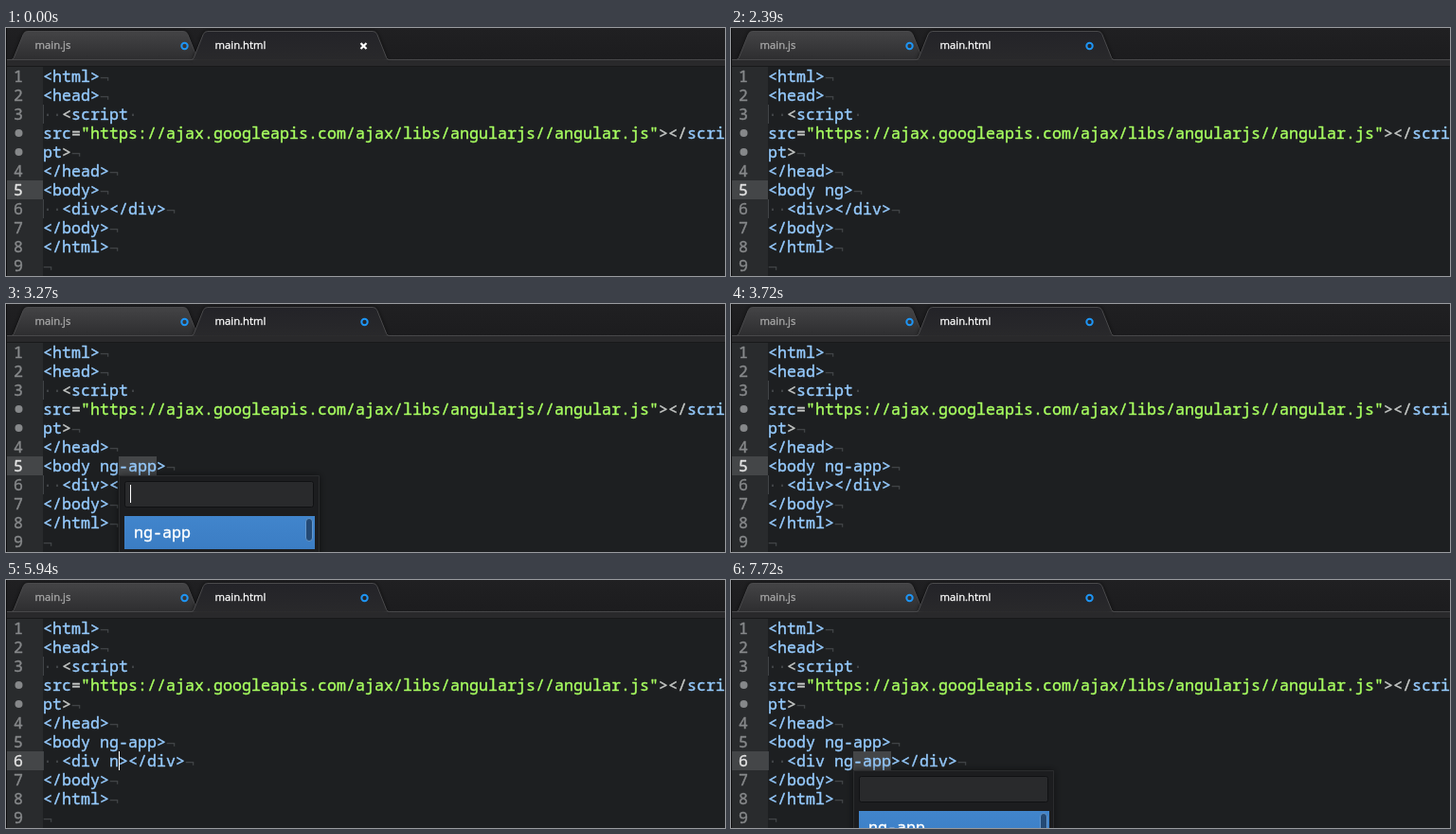
An HTML page with a canvas for the animation above (8000 ms loop, 759x262 px).

```html
<!DOCTYPE html>
<html lang="en">
<head>
<meta charset="utf-8">
<title>Editor</title>
<style>
html, body { margin: 0; width: 100%; height: 100%; overflow: hidden; background: #1d1f21; }
canvas { display: block; }
</style>
</head>
<body>
<canvas id="stage" width="759" height="262"></canvas>
<script>
const ctx = document.getElementById('stage').getContext('2d');
const LOOP = 8000, LEFT = 39, TOP = 41, CHAR = 10, ROW = 20;
const CODE_FONT = '16.6px "Noto Sans Mono", monospace';
const MARK_FONT = '16.6px "DejaVu Sans Mono", monospace';
const TAB_FONT = '11.3px "Open Sans", sans-serif';
const BLUE = '#96cbfe', GREEN = '#a8ff60', PLAIN = '#c5c8c6', FAINT = '#404346';

// Each step changes only the listed parts of the editor state.
const steps = [
  [0, { body: '', div: '', line: 5, col: 5, caret: false, modified: false, popup: null }],
  [440, { caret: true }],
  [740, { caret: false }],
  [890, { body: ' ', col: 6, caret: true }],
  [1040, { modified: true }],
  [1190, { caret: false }],
  [1490, { caret: true }],
  [1640, { body: ' n', col: 7 }],
  [2090, { body: ' ng', col: 8 }],
  [2390, { caret: false }],
  [2530, { body: ' ng-app', popup: { focus: true } }],
  [2830, { popup: { focus: false } }],
  [3270, { popup: { focus: true } }],
  [3720, { popup: null, col: 12 }],
  [4020, { caret: true }],
  [4310, { line: 6 }],
  [4460, { col: 11 }],
  [4610, { col: 10 }],
  [4750, { col: 9 }],
  [4900, { col: 8 }],
  [5040, { col: 7 }],
  [5190, { col: 6 }],
  [5340, { caret: false }],
  [5640, { caret: true }],
  [5790, { div: ' ', col: 7 }],
  [5940, { div: ' n', col: 8 }],
  [6240, { div: ' ng', col: 9 }],
  [6390, { div: ' ng-', col: 10 }],
  [6830, { div: ' ng', col: 9 }],
  [7280, { caret: false }],
  [7430, { div: ' ng-app', popup: { focus: true } }],
  [7720, { popup: { focus: false } }]
];

const stateAt = time =>
  Object.assign({}, ...steps.filter(([start]) => start <= time).map(([, change]) => change));

function rect(x, y, w, h, color) {
  ctx.fillStyle = color;
  ctx.fillRect(x, y, w, h);
}

function text(string, x, y, color, font = CODE_FONT, weight = .4) {
  ctx.font = font;
  ctx.fillStyle = ctx.strokeStyle = color;
  ctx.fillText(string, x, y);
  if (!weight) return;
  ctx.lineWidth = weight;
  ctx.lineJoin = 'round';
  ctx.strokeText(string, x, y);
}

// Code keeps to the character grid whatever the font's own advance.
function code(string, x, y, color) {
  [...string].forEach((char, i) => text(char, x + i * CHAR, y, color));
}

function disc(x, y, radius, color) {
  ctx.beginPath();
  ctx.arc(x, y, radius, 0, Math.PI * 2);
  ctx.fillStyle = color;
  ctx.fill();
}

function box(x, y, w, h, radius, fill, stroke) {
  ctx.beginPath();
  ctx.roundRect(x + .5, y + .5, w - 1, h - 1, radius);
  ctx.fillStyle = fill;
  ctx.fill();
  ctx.strokeStyle = stroke;
  ctx.lineWidth = 1;
  ctx.stroke();
}

function verticalGradient(y0, y1, from, to) {
  const gradient = ctx.createLinearGradient(0, y0, 0, y1);
  gradient.addColorStop(0, from);
  gradient.addColorStop(1, to);
  return gradient;
}

function tab(x, width, label, color, fill, edge) {
  const right = x + width;
  ctx.beginPath();
  ctx.moveTo(x, 33.5);
  ctx.arcTo(x + 3, 33.5, x + 15, 3.5, 3);
  ctx.arcTo(x + 15, 3.5, right - 15, 3.5, 5);
  ctx.arcTo(right - 15, 3.5, right - 3, 33.5, 5);
  ctx.arcTo(right - 3, 33.5, right, 33.5, 3);
  ctx.lineTo(right, 33.5);
  ctx.save();
  ctx.shadowColor = 'rgba(0, 0, 0, .7)';
  ctx.shadowBlur = 5;
  ctx.fillStyle = fill;
  ctx.fill();
  ctx.restore();
  ctx.strokeStyle = edge;
  ctx.lineWidth = 1;
  ctx.stroke();
  text(label, x + 26, 22, color, TAB_FONT, .3);
}

function modifiedRing(x) {
  ctx.beginPath();
  ctx.arc(x, 19, 3.2, 0, Math.PI * 2);
  ctx.strokeStyle = '#1e95f5';
  ctx.lineWidth = 2;
  ctx.stroke();
}

function closeCross(x) {
  ctx.beginPath();
  ctx.moveTo(x - 3, 16);
  ctx.lineTo(x + 3, 22);
  ctx.moveTo(x + 3, 16);
  ctx.lineTo(x - 3, 22);
  ctx.strokeStyle = '#fff';
  ctx.lineWidth = 2.2;
  ctx.stroke();
}

function drawTabs(modified) {
  rect(0, 0, 759, 34, verticalGradient(0, 34, '#202022', '#1c1c1e'));
  tab(4.5, 201, 'main.js', '#aaa', verticalGradient(3, 33, '#444446', '#2e2e30'), '#4a4a4c');
  rect(0, 33, 759, 1, '#48484a');
  rect(0, 34, 759, 6, '#29292b');
  tab(194.5, 211, 'main.html', '#fff', verticalGradient(3, 34, '#232328', '#29292b'), '#4a4a4c');
  rect(197, 34, 206, 6, '#29292b');
  rect(0, 40, 759, 1, '#18191a');
  modifiedRing(188.5);
  modified ? modifiedRing(378.5) : closeCross(377.5);
}

// Segments are [string, color] pairs.
function drawLine(row, segments, { newline = true, indent = 0, trailing = false } = {}) {
  const baseline = TOP + row * ROW + 16;
  const mark = (char, drop = 0) => text(char, x, baseline + drop, FAINT, MARK_FONT, 0);
  let x = LEFT;
  if (indent) rect(LEFT, TOP + row * ROW, 1, ROW, FAINT);
  for (let i = 0; i < indent; i++, x += CHAR) mark('·');
  for (const [string, color] of segments) {
    code(string, x, baseline, color);
    x += string.length * CHAR;
  }
  if (trailing) mark('·');
  else if (newline) mark('¬', 2);
}

function drawGutter(activeRow) {
  rect(0, TOP, LEFT, 262 - TOP, '#292b2d');
  rect(1, TOP + activeRow * ROW, LEFT - 1, ROW, '#444648');
  ['1', '2', '3', '', '', '4', '5', '6', '7', '8', '9'].forEach((label, row) => {
    const y = TOP + row * ROW;
    const color = row === activeRow ? '#e4e4e4' : '#86888a';
    if (label) code(label, 8, y + 16, color);
    else disc(13.5, y + 10, 4, color);
  });
  rect(0, 0, 1, 262, '#0c0c0d');
}

function drawCode({ body, div }) {
  const tag = string => [[string, BLUE]];
  drawLine(0, tag('<html>'));
  drawLine(1, tag('<head>'));
  drawLine(2, [['<', PLAIN], ['script', BLUE]], { indent: 2, trailing: true });
  drawLine(3, [
    ['src', BLUE], ['=', PLAIN],
    ['"https://ajax.googleapis.com/ajax/libs/angularjs//angular.js"', GREEN],
    ['></', PLAIN], ['scri', BLUE]
  ], { newline: false });
  drawLine(4, [['pt', BLUE], ['>', PLAIN]]);
  drawLine(5, tag('</head>'));
  drawLine(6, tag(`<body${body}>`));
  drawLine(7, tag(`<div${div}></div>`), { indent: 2 });
  drawLine(8, tag('</body>'));
  drawLine(9, tag('</html>'));
  drawLine(10, []);
}

function drawPopup(x, y, focus) {
  ctx.save();
  ctx.shadowColor = 'rgba(0, 0, 0, .5)';
  ctx.shadowBlur = 8;
  rect(x, y, 212, 120, '#1c1d1f');
  ctx.restore();
  box(x, y, 212, 120, 0, '#1c1d1f', '#2b2c2e');
  box(x + 6, y + 6, 200, 28, 2, '#292a2c', '#101113');
  if (focus) rect(x + 12, y + 10, 1, 19, '#fff');
  rect(x + 6, y + 43, 201, 35, verticalGradient(y + 43, y + 78, '#4185cc', '#3b7dc4'));
  code('ng-app', x + 16, y + 66, '#fff');
  box(x + 197, y + 45, 8, 25, 4, '#244a75', '#6496ca');
}

function render(now) {
  const state = stateAt(now % LOOP);
  const row = state.line + 1;
  const x = LEFT + state.col * CHAR, y = TOP + row * ROW;
  rect(0, 0, 759, 262, '#1d1f21');
  drawTabs(state.modified);
  drawGutter(row);
  if (state.popup) rect(x, y, 4 * CHAR, ROW, '#444648');
  drawCode(state);
  if (state.caret) rect(x, y, 1, ROW, '#fff');
  if (state.popup) drawPopup(x, y + ROW, state.popup.focus);
}

const start = performance.now();
function tick() {
  render(performance.now() - start);
  requestAnimationFrame(tick);
}
tick();
</script>
</body>
</html>
```
